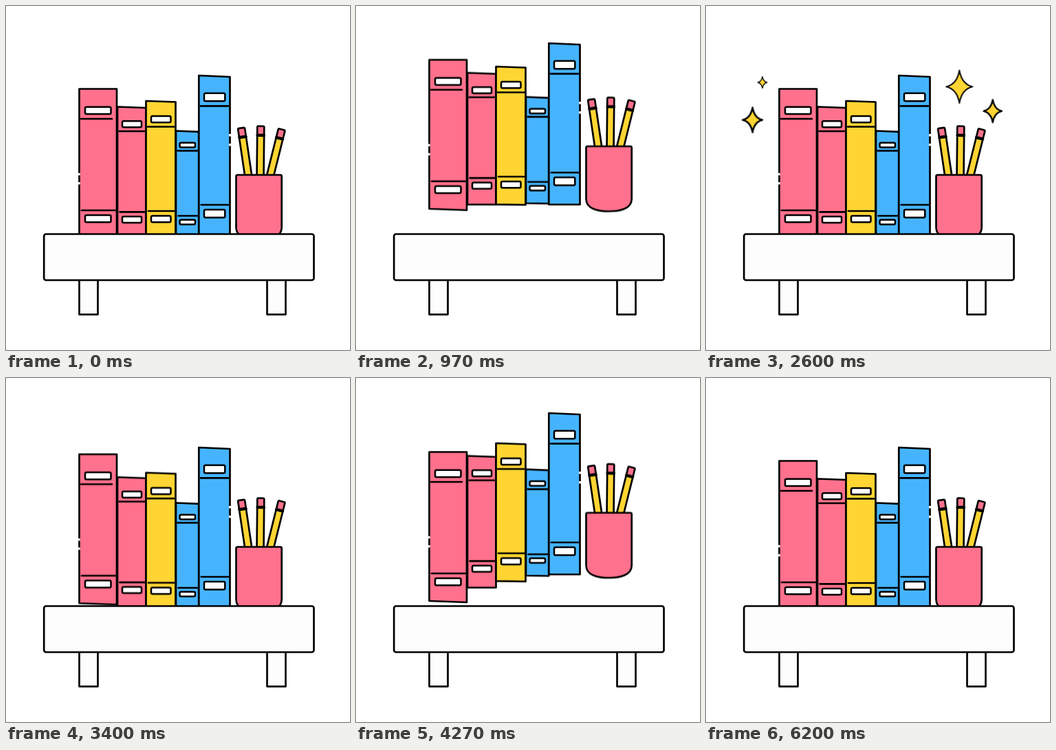
An HTML page that plays this animation: 500x500 px, repeating every 6.23 s.

```html
<!DOCTYPE html>
<html lang="en">
<head>
<meta charset="utf-8">
<title>Bouncing bookshelf</title>
<style>
  html, body { margin: 0; width: 100%; height: 100%; overflow: hidden; background: #fff; }
  svg { display: block; width: 100vw; height: 100vh; stroke: #000; stroke-width: 2.7; stroke-linejoin: round; stroke-linecap: round; }
  .pink { fill: #ff718d; }
  .yellow { fill: #fed532; }
  .blue { fill: #46b4fd; }
  .white { fill: #fdfdfd; }
  .label { fill: #fff; stroke-width: 2.5; }
  .gap { stroke: #fff; stroke-width: 3.4; stroke-linecap: butt; }

  /* rise 833 ms, drop 395 ms */
  .hop { animation: hop 3115ms infinite; }
  @keyframes hop {
    0% { transform: translateY(0); animation-timing-function: cubic-bezier(.3333, 0, .6667, 0); }
    13.37% { transform: translateY(-25px); animation-timing-function: cubic-bezier(.3333, 1, .6667, 1); }
    26.74% { transform: translateY(-50px); animation-timing-function: cubic-bezier(.3333, 0, .6667, .3333); }
    39.42%, 100% { transform: translateY(0); }
  }

  /* grow 500 ms, hold 174 ms, shrink 500 ms */
  .twinkle { animation: twinkle 3115ms cubic-bezier(.3333, 0, .6667, 1) infinite; }
  @keyframes twinkle {
    0% { transform: scale(0); }
    16.05%, 21.64% { transform: scale(1); }
    37.69%, 100% { transform: scale(0); }
  }
</style>
</head>
<body>
<svg viewBox="0 0 500 500">
  <g id="items"></g>
  <g class="white">
    <rect x="106.5" y="390" width="27" height="58.3"/>
    <rect x="379.5" y="390" width="27" height="58.3"/>
    <rect x="55.2" y="331.5" width="392.3" height="67" rx="3"/>
  </g>
  <g id="stars"></g>
</svg>
<script>
  const PERIOD = 3115;
  // Negative delays put every part mid-cycle at load.
  const delay = start => `style="animation-delay:${start - PERIOD}ms"`;

  const line = (x1, x2, y) => `<path d="M${x1} ${y}H${x2}"/>`;
  const label = (x1, x2, y, h) =>
    `<rect class="label" x="${x1}" y="${y}" width="${x2 - x1}" height="${h}" rx="2"/>`;
  const gap = (x, y) => `<path class="gap" d="M${x} ${y}v3.4"/>`;

  // left/right: top corner heights; bands and labels are [upper, lower]
  function book(b) {
    const [x1, x2] = b.x, [l1, l2] = b.label;
    return `<g class="hop" ${delay(b.start)}>
      <path class="${b.color}" d="M${x1} ${b.top[0]}L${x2} ${b.top[1]}V${b.bottom[1]}L${x1} ${b.bottom[0]}Z"/>
      ${line(x1 + 2.5, x2 - b.trim, b.bands[0])}${line(x1 + 3.5, x2 - 2, b.bands[1])}
      ${b.labelY.map(y => label(l1, l2, y, b.labelH)).join('')}
      ${(b.gaps || []).map(([x, y]) => gap(x, y)).join('')}
    </g>`;
  }

  const books = [
    { color: 'pink', start: -17, x: [106.5, 161], top: [120.5, 120.5], bottom: [337, 339], trim: 7,
      bands: [164, 297], label: [115, 152.5], labelY: [146.7, 304], labelH: 10.3,
      gaps: [[106, 242.8], [106, 256]] },
    { color: 'pink', start: 95, x: [162, 203.5], top: [146.5, 148], bottom: [338, 338], trim: 2,
      bands: [182, 299.3], label: [169, 197], labelY: [167.2, 306], labelH: 9 },
    { color: 'yellow', start: 178, x: [203.5, 246.5], top: [138, 139.5], bottom: [338.3, 339], trim: 2,
      bands: [175.5, 298], label: [211, 239.5], labelY: [160, 305], labelH: 9.2 },
    { color: 'blue', start: 262, x: [247, 280.2], top: [181.5, 182.8], bottom: [336, 336.5], trim: 2,
      bands: [210.3, 305], label: [252.5, 275], labelY: [198.8, 310.7], labelH: 6.8 },
    { color: 'blue', start: 345, x: [280.3, 325.5], top: [101, 103], bottom: [335.5, 335.5], trim: 2,
      bands: [145.3, 289], label: [288, 318.3], labelY: [126.8, 296], labelH: 11.4,
      gaps: [[325.8, 186], [325.8, 200]] },
  ];

  const pencil = (x, y, turn) => `<g transform="translate(${x} ${y}) rotate(${turn})">
    <rect class="yellow" x="-5" y="13" width="10" height="68"/>
    <rect class="pink" x="-5" y="0" width="10" height="13" rx="1.5"/>
    <path d="M-4.6 13.2h9.2" stroke-width="4.4"/>
  </g>`;

  const cup = `<g class="hop" ${delay(428)}>
    ${pencil(342, 177.4, -8.4)}${pencil(370.3, 174.7, .6)}${pencil(400.8, 179.4, 14)}
    <path class="pink" d="M336.5 245.5H398.7Q400.7 245.5 400.7 247.5V322C400.7 336 384 340 367.5 340S334.5 336 334.5 322V247.5Q334.5 245.5 336.5 245.5Z"/>
  </g>`;

  function star(x, y, r, start) {
    const w = r * .8, c = r * .15;
    return `<g transform="translate(${x} ${y})"><path class="yellow twinkle" ${delay(start)} stroke-width="2.5"
      d="M0 ${-r}Q${c} ${-c} ${w} 0Q${c} ${c} 0 ${r}Q${-c} ${c} ${-w} 0Q${-c} ${-c} 0 ${-r}Z"/></g>`;
  }

  document.getElementById('items').innerHTML = books.map(book).join('') + cup;
  document.getElementById('stars').innerHTML =
    star(82, 111, 16, 1686) + star(368.3, 117.3, 31, 1770) +
    star(416.7, 152.7, 17.5, 1853) + star(67.6, 165.6, 18, 1936);
</script>
</body>
</html>
```
